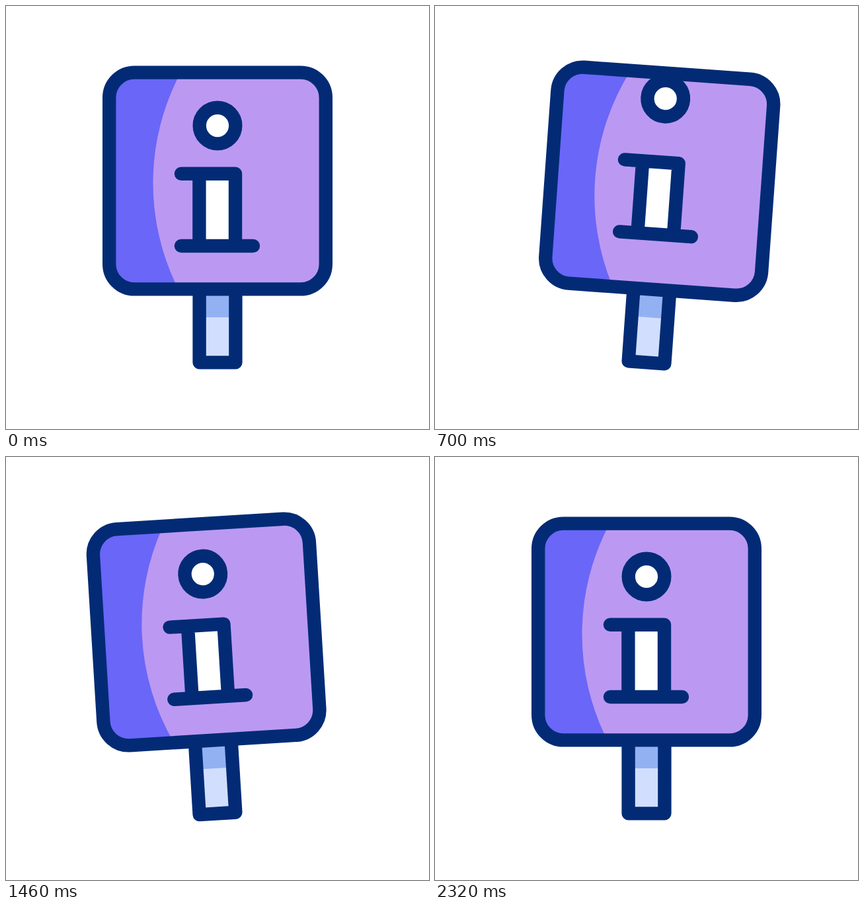
Recreate the animation shown at these times as an HTML page. Size 640 by 640 pixels, loop 3.02 s.

```html
<!DOCTYPE html>
<html lang="en">
<head>
<meta charset="utf-8">
<title>Swinging info sign</title>
<style>
  html, body { margin: 0; width: 100%; height: 100%; overflow: hidden; background: #fff; }
  svg { display: block; width: 100vw; height: 100vh; }
  .line { fill: none; stroke: #032b75; stroke-width: 20.4; stroke-linecap: round; stroke-linejoin: round; }
</style>
</head>
<body>
<svg viewBox="0 0 640 640">
  <defs>
    <clipPath id="board"><rect x="156.2" y="100.6" width="327.6" height="327.8" rx="38"/></clipPath>
  </defs>
  <g id="sign">
    <rect x="292.6" y="428" width="54.8" height="111.4" fill="#d2defe"/>
    <rect x="292.6" y="428" width="54.8" height="43" fill="#92b1f3"/>
    <path class="line" d="M292.6 428V539.4H347.4V428"/>

    <g clip-path="url(#board)">
      <rect x="150" y="95" width="340" height="340" fill="#bb99f2"/>
      <path fill="#6a66f8" d="M150 100.6H264.3A356 356 0 0 0 260.7 428.4H150Z"/>
    </g>
    <rect class="line" x="156.2" y="100.6" width="327.6" height="327.8" rx="38"/>

    <g id="stem">
      <rect x="292.4" y="253.7" width="54.6" height="109.3" fill="#fff"/>
      <path class="line" d="M265 253.7H347V363M292.4 253.7V363M265 363H374"/>
    </g>
    <circle id="dot" class="line" cx="320" cy="181" r="27.3" style="fill:#fff"/>
  </g>
</svg>
<script>
  const LOOP = 3020;
  const [sign, stem, dot] = ['sign', 'stem', 'dot'].map(id => document.getElementById(id));

  // Turning points as [time, value]; each part moves evenly between them.
  const SWING = [[370, 0], [885, 6.4], [1340, -4.9], [1975, 2.4], [2160, 0]];
  const HOP = [[385, 0], [750, -21], [1100, 0]];
  const BOUNCE = [[0, 0], [385, 17], [750, -51], [1270, -2], [1795, -9.2], [2320, 0]];

  function at(keys, time) {
    const i = keys.findIndex(k => k[0] > time);
    if (i < 1) return 0;
    const [t0, v0] = keys[i - 1], [t1, v1] = keys[i];
    return v0 + (v1 - v0) * (time - t0) / (t1 - t0);
  }

  function shift(part, dy) {
    part.setAttribute('transform', `translate(0 ${dy.toFixed(2)})`);
  }

  function draw(time) {
    sign.setAttribute('transform', `rotate(${at(SWING, time).toFixed(3)} 320 539.5)`);
    shift(stem, at(HOP, time));
    shift(dot, at(BOUNCE, time));
  }

  const start = performance.now();
  function tick() {
    draw((performance.now() - start) % LOOP);
    requestAnimationFrame(tick);
  }
  tick();
</script>
</body>
</html>
```
